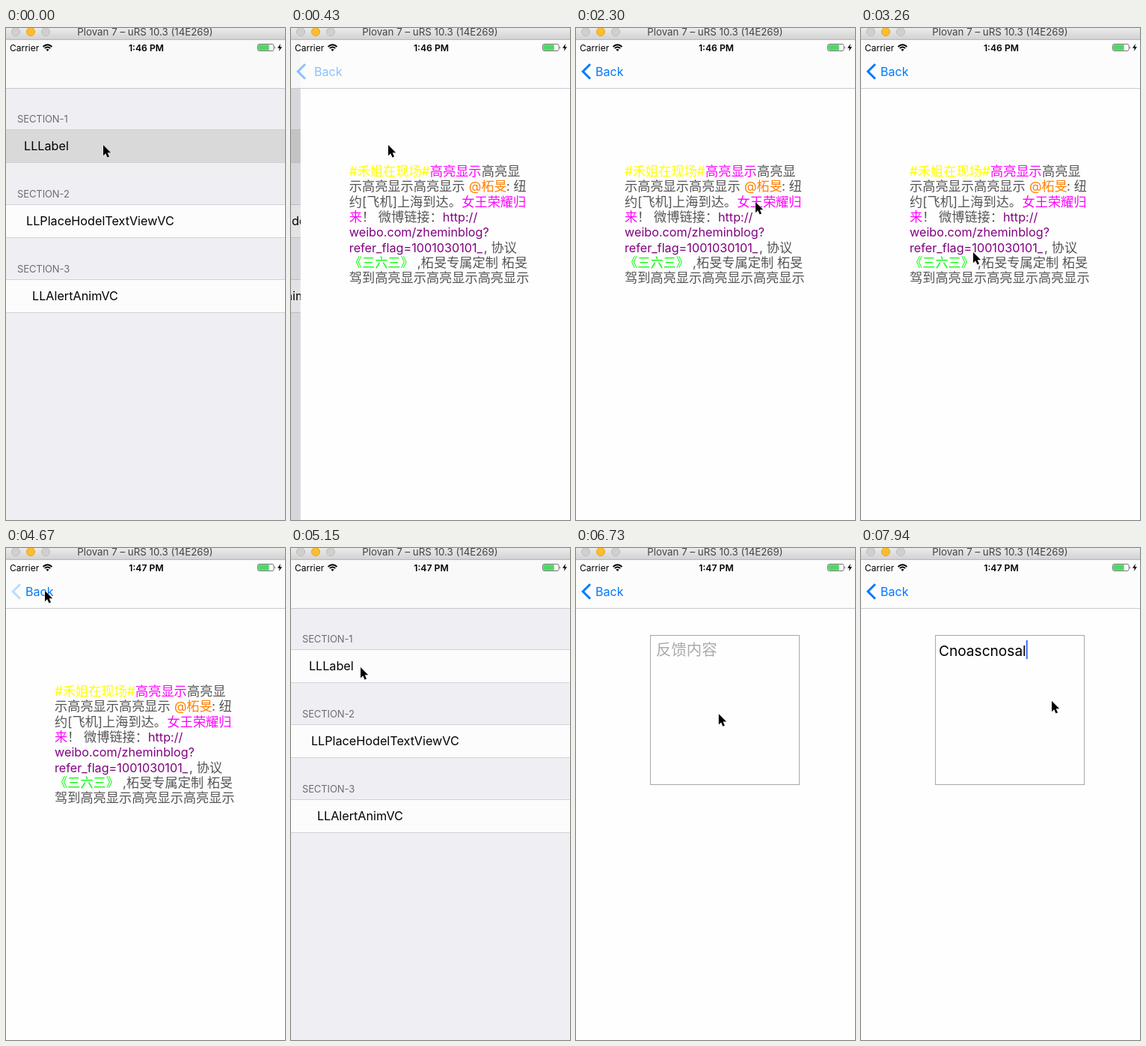
Recreate the animation shown at these times as an HTML page. Size 373 by 656 pixels, loop 8000 ms.

```html
<!DOCTYPE html>
<html lang="zh">
<head>
<meta charset="utf-8">
<title>Label and text view demo</title>
<style>
  html, body { margin: 0; width: 100%; height: 100%; overflow: hidden; background: #fefefe; }
  svg { display: block; width: 100vw; height: 100vh; }
  text { font-family: Inter, "Noto Sans CJK SC", "Noto Sans CJK", sans-serif; white-space: pre; }
  .cell { font-size: 16.2px; }
  .section { font-size: 13px; letter-spacing: -.1px; fill: #6d6d72; }
  .rich { font-size: 17.2px; }
  .rich .latin { font-size: 16.2px; }
  .back { fill: #007aff; font-size: 16.1px; }
  .placeholder { fill: #aaa; font-size: 20.4px; }
  .typed { font-size: 19.1px; }
</style>
</head>
<body>
<svg viewBox="0 0 373 656" preserveAspectRatio="none">
  <defs>
    <linearGradient id="chrome" x2="0" y2="1">
      <stop stop-color="#ebebeb"/><stop offset="1" stop-color="#d2d2d2"/>
    </linearGradient>
  </defs>
  <g id="list">
    <rect y="16" width="373" height="640" fill="#eeeef3"/>
    <g id="cells"></g>
    <rect id="dim" y="16" width="373" height="640"/>
  </g>
  <g id="page">
    <rect y="16" width="373" height="640" fill="#fefefe"/>
    <g id="labelPage"><g id="marks" fill="#f2f2f2"></g><g id="rich" class="rich"></g></g>
    <g id="fieldPage">
      <rect x="99.5" y="116.5" width="199" height="199" fill="none" stroke="#a8a8a8"/>
      <text id="placeholder" class="placeholder" x="107" y="143">反馈内容</text>
      <text id="typed" class="typed" x="104" y="143.5"></text>
      <rect id="caret" y="123" width="2" height="25" fill="#426bf2"/>
    </g>
  </g>
  <rect y="15" width="373" height="65" fill="#fcfcfc" opacity=".85"/>
  <rect y="80" width="373" height="1" fill="#c9c9cc"/>
  <path id="chevron" d="M19 48.2L9.2 58L19 67.8" fill="none" stroke="#007aff" stroke-width="3"/>
  <text id="back" class="back" y="64">Back</text>

  <rect width="373" height="15" fill="url(#chrome)"/>
  <rect y="15" width="373" height="1" fill="#b8b8b8"/>
  <circle cx="13" cy="5" r="5.5" fill="#d0d0d0" stroke="#bdbdbd"/>
  <circle cx="33" cy="5" r="5.5" fill="#fdbd2e" stroke="#e3a51f"/>
  <circle cx="53" cy="5" r="5.5" fill="#d0d0d0" stroke="#bdbdbd"/>
  <text x="186" y="10.3" text-anchor="middle" font-size="13.3" fill="#444">Plovan 7 – uRS 10.3 (14E269)</text>
  <text x="5" y="31" font-size="12">Carrier</text>
  <g fill="none" stroke="#000" stroke-width="1.8">
    <path d="M49.5 25Q55.5 19.4 61.5 25M51.7 27.2Q55.5 23.8 59.3 27.2"/>
    <path d="M55.5 31L53.4 28.8Q55.5 27.2 57.6 28.8Z" fill="#000" stroke="none"/>
  </g>
  <text id="clock" x="187.5" y="30.6" text-anchor="middle" font-size="12.2" font-weight="600"></text>
  <rect x="336.5" y="21.5" width="21.5" height="9" rx="2" fill="none" stroke="#777"/>
  <rect x="337.3" y="22.3" width="14.4" height="7.4" rx="1" fill="#4cd964"/>
  <path d="M359 24.2Q361 26 359 27.8Z" fill="#777"/>
  <path d="M367 21L363 26.8H365.8L364.8 31L369 25.2H366.2Z"/>
  <path id="pointer" d="M0 0V14.2L3.2 11.2L5.5 16.6L8 15.5L5.7 10.3H10.2Z" stroke="#fff" stroke-width="1" paint-order="stroke"/>
</svg>
<script>
const LOOP = 8000, WIDTH = 373;
const $ = id => document.getElementById(id);
const clamp = v => Math.max(0, Math.min(1, v));
const show = (id, on) => { $(id).style.display = on ? '' : 'none'; };

// Menu rows: title and its left inset
$('cells').innerHTML = [['LLLabel', 24], ['LLPlaceHodelTextViewVC', 27], ['LLAlertAnimVC', 35]]
  .map(([title, x], i) => {
    const y = 135 + i * 100;
    return `<text class="section" x="15" y="${y - 9.5}">SECTION-${i + 1}</text>
      <rect y="${y}" width="373" height="45" fill="#fcfcfc"/>
      <rect id="selected${i}" y="${y}" width="373" height="45" fill="#d9d9d9" opacity="0"/>
      <path d="M0 ${y + .5}H373M0 ${y + 44.5}H373" stroke="#d2d2d6"/>
      <text class="cell" x="${x}" y="${y + 28}">${title}</text>`;
  }).join('');

const GRAY = '#555', PINK = '#f0f', PURPLE = '#800080';
const LINE = 20.35;
const richLines = [
  [[65, '#禾姐在现场#', '#ff0'], [173, '高亮显示', PINK], [242, '高亮显', GRAY]],
  [[65, '示高亮显示高亮显示', GRAY], [225, '@柘旻', '#ff8000'], [275, ': 纽', GRAY]],
  [[65, '约[飞机]上海到达。', GRAY], [215.5, '女王荣耀归', PINK]],
  [[65, '来', PINK], [82, '！', GRAY], [104, '微博链接：', GRAY], [190, 'http://', PURPLE]],
  [[65, 'weibo.com/zheminblog?', PURPLE]],
  [[65, 'refer_flag=1001030101_', PURPLE], [245, ', 协议', GRAY]],
  [[65, '《三六三》', '#0f0'], [156, ',柘旻专属定制 柘旻', GRAY]],
  [[65, '驾到高亮显示高亮显示高亮显示', GRAY]]
];
$('rich').innerHTML = richLines.map((line, row) => line.map(([x, words, color]) =>
  `<text x="${x}" y="${196.8 + row * LINE}" fill="${color}"${/^[\x21-\x7e]+$/.test(words) ? ' class="latin"' : ''}>${words}</text>`
).join('')).join('');

// Pressed links: on, off, then boxes of row, left, right
const presses = [
  [960, 1080, [0, 65, 173]],
  [1560, 1710, [0, 172, 242]],
  [2180, 2300, [2, 215, 308], [3, 65, 82]],
  [2750, 2870, [3, 190, 308], [4, 65, 308], [5, 65, 246]],
  [3640, 3870, [6, 65, 151]]
];
$('marks').innerHTML = presses.map(([, , ...boxes], i) => `<g id="mark${i}">` + boxes.map(([row, left, right]) =>
  `<rect x="${left}" y="${180.3 + row * LINE}" width="${right - left}" height="${LINE}"/>`).join('') + '</g>').join('');

const pointerPath = [
  [0, 130, 156], [560, 130, 156], [900, 152, 187], [1300, 152, 187], [1520, 200, 188],
  [1870, 200, 188], [2150, 240, 232], [2500, 240, 232], [2720, 214, 263], [3070, 214, 263],
  [3260, 150, 299], [3580, 110, 306], [3900, 110, 306], [4480, 52, 57], [4780, 52, 57],
  [5150, 93, 159], [5440, 136, 247], [5500, 145, 256], [5960, 145, 256], [6300, 188, 222],
  [6710, 188, 222], [6880, 255, 204], [LOOP, 255, 204]
];
const typing = [[7390, 'C'], [7410, 'Cn'], [7560, 'Cnoa'], [7590, 'Cnoas'],
  [7800, 'Cnoascn'], [7870, 'Cnoascnos'], [7940, 'Cnoascnosal']];

function pointerAt(t) {
  const i = pointerPath.findIndex(key => key[0] > t);
  const [t0, x0, y0] = pointerPath[i - 1], [t1, x1, y1] = pointerPath[i];
  const u = (t - t0) / (t1 - t0), k = u * u * (3 - 2 * u);
  return [x0 + (x1 - x0) * k, y0 + (y1 - y0) * k];
}

// Critically damped settling from 1 to 0
function remain(ms) {
  const s = Math.max(0, ms) * .0207;
  return s > 11 ? 0 : (1 + s) * Math.exp(-s);
}

// The back button reacts at PRESS, the page starts to slide at POP
const PUSH_LABEL = 180, PRESS = 4670, POP = 4700, PUSH_FIELD = 5740;

function draw(t) {
  const popping = t >= PRESS && t < PUSH_FIELD;
  const since = t - (popping ? POP : t < PRESS ? PUSH_LABEL : PUSH_FIELD);
  const pushed = popping ? remain(since) : 1 - remain(since);
  const fade = popping ? 1 - clamp(since / 220) : clamp((since - 130) / 270);

  $('list').setAttribute('transform', `translate(${-112 * pushed})`);
  $('page').setAttribute('transform', `translate(${WIDTH * (1 - pushed)})`);
  $('dim').setAttribute('opacity', .1 * pushed);
  $('back').setAttribute('x', 26 + 147 * (1 - pushed));
  $('back').setAttribute('opacity', fade);
  $('chevron').setAttribute('opacity', popping ? fade * .25 : fade);
  $('selected0').setAttribute('opacity', 1 - clamp((t - POP) / 380));
  $('selected1').setAttribute('opacity', t < PUSH_FIELD ? 0 : 1);
  show('labelPage', t < PUSH_FIELD);
  show('fieldPage', t >= PUSH_FIELD);
  presses.forEach(([on, off], i) => show('mark' + i, t >= on && t < off));

  const words = typing.reduce((now, [at, value]) => t >= at ? value : now, '');
  if ($('typed').textContent !== words) $('typed').textContent = words;
  show('placeholder', !words);
  show('caret', t >= 7030);
  $('caret').setAttribute('x', words ? 104 + $('typed').getComputedTextLength() : 103);

  $('clock').textContent = t < 4200 ? '1:46 PM' : '1:47 PM';
  $('pointer').setAttribute('transform', `translate(${pointerAt(t)})`);
}

const start = performance.now();
function frame() {
  draw((performance.now() - start) % LOOP);
  requestAnimationFrame(frame);
}
frame();
</script>
</body>
</html>
```
